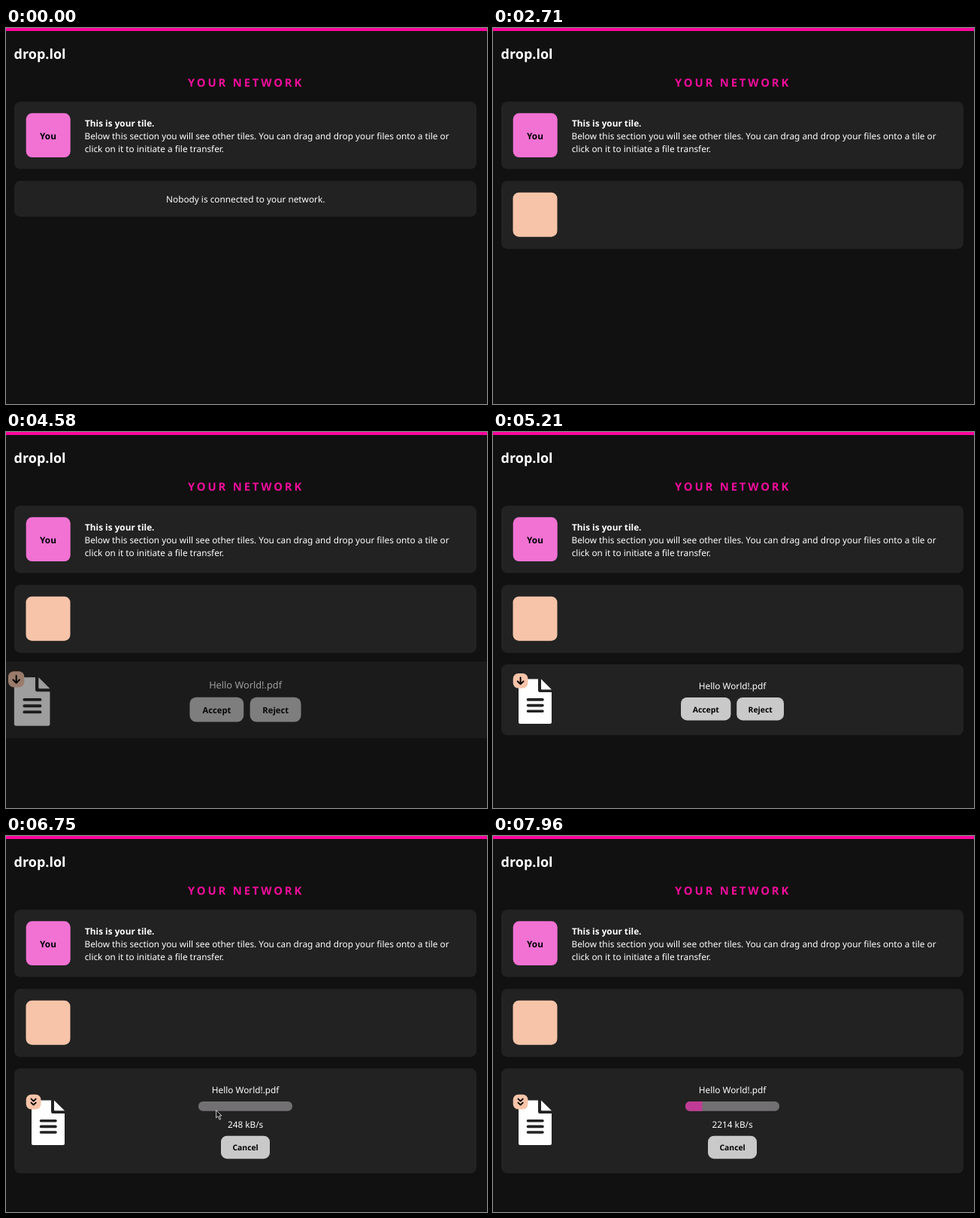
These frames come from a looping animation (640 px wide and 500 px high, 8000 ms). An HTML page:

```html
<!DOCTYPE html>
<html lang="en">
<head>
<meta charset="utf-8">
<title>Your network</title>
<style>
  html, body { margin: 0; width: 100%; height: 100%; overflow: hidden; background: #111; }
  svg { display: block; width: 640px; height: 500px; }
  text { font: 11.8px "Noto Sans", "Open Sans", sans-serif; fill: #fff; text-rendering: geometricPrecision; white-space: pre; }
  .bold { font-weight: 700; }
  .logo { font-size: 18px; font-weight: 700; }
  .title { font-size: 14.8px; font-weight: 700; letter-spacing: 2.85px; fill: #f20d9b; }
  .mid { text-anchor: middle; }
  .label { font-size: 10.4px; font-weight: 700; fill: #000; text-anchor: middle; }
  .panel { fill: #222; }
  .peach { fill: #f7c4a9; }
  .button { fill: #c9c9c9; }
  .mark { fill: none; stroke: #000; stroke-width: 1.9; stroke-linecap: round; stroke-linejoin: round; }
</style>
</head>
<body>
<svg viewBox="0 0 640 500">
  <defs>
    <g id="file">
      <path fill="#fff" d="M36 0H60V15Q60 17.5 62.5 17.5H78V57.5Q78 59.5 76 59.5H36Q34 59.5 34 57.5V2Q34 0 36 0Z M64 0L78 13.8H65.2Q64 13.8 64 12.6Z"/>
      <path stroke="#222" stroke-width="3.6" stroke-linecap="round" d="M46.5 27.3H66 M46.5 35H66 M46.5 42.6H66"/>
      <rect class="peach" x="26.7" y="-7.6" width="19.8" height="19.8" rx="7"/>
    </g>
  </defs>
  <rect width="640" height="500" fill="#111"/>
  <rect width="640" height="4" fill="#ff069e"/>
  <text class="logo" x="10.6" y="40.7">drop.lol</text>
  <text class="title" x="242" y="78">YOUR NETWORK</text>

  <rect class="panel" x="11" y="98" width="615" height="89.5" rx="8"/>
  <rect x="26.7" y="113.3" width="59" height="58.7" rx="8" fill="#f272d4"/>
  <text class="bold mid" x="56" y="148" style="fill:#000">You</text>
  <text class="bold" x="105" y="131">This is your tile.</text>
  <text x="104.5" y="148">Below this section you will see other tiles. You can drag and drop your files onto a tile or</text>
  <text x="104.7" y="164.6">click on it to initiate a file transfer.</text>

  <rect id="peers" class="panel" x="11" y="203.3" width="615" height="47.7" rx="8"/>
  <text id="nobody" class="mid" x="318.7" y="232.4">Nobody is connected to your network.</text>
  <rect id="tile" class="peach" x="-29.5" y="-29.5" width="59" height="59" rx="8"/>

  <g id="transfer">
    <rect id="card" class="panel" x="11" y="309" width="615" height="94.3" rx="8"/>
    <text class="mid" x="318.6" y="342.2">Hello World!.pdf</text>
    <g id="offer">
      <g transform="translate(0 328.6)">
        <use href="#file"/>
        <path class="mark" d="M36.6 -2.2V6.6 M32.7 2.9L36.6 6.8L40.5 2.9"/>
      </g>
      <rect class="button" x="250" y="353" width="66.4" height="30.4" rx="8"/>
      <text class="label" x="283.3" y="373">Accept</text>
      <rect class="button" x="324.2" y="353" width="62.8" height="30.4" rx="8"/>
      <text class="label" x="355.7" y="373">Reject</text>
    </g>
    <g id="loading">
      <g transform="translate(0 351.4)">
        <use href="#file"/>
        <path class="mark" d="M33.5 -1.8L36.6 1.2L39.7 -1.8 M33.5 3.2L36.6 6.2L39.7 3.2"/>
      </g>
      <clipPath id="track"><rect x="256" y="353" width="125" height="12.8" rx="6"/></clipPath>
      <g clip-path="url(#track)">
        <rect x="256" y="353" width="125" height="13" fill="#727072"/>
        <rect id="fill" x="256" y="353" width="0" height="13" fill="#c03b95"/>
      </g>
      <text id="speed" class="mid" x="318.6" y="387.6"></text>
      <rect class="button" x="286" y="398.7" width="65" height="30.5" rx="8"/>
      <text class="label" x="318.6" y="418">Cancel</text>
    </g>
  </g>

  <path id="cursor" d="M0 0V10.2L2.4 8L4.4 12.5L6.1 11.7L4.2 7.4H7.4Z" fill="#161616" stroke="#dcdcdc" stroke-width=".9"/>
</svg>
<script>
const LOOP = 8000, JOIN = 1000, OFFER = 4560, ACCEPT = 6540;
const el = Object.fromEntries([...document.querySelectorAll('svg [id]')].map(n => [n.id, n]));
const clamp = x => Math.min(1, Math.max(0, x));
const show = (node, on) => node.setAttribute('display', on ? 'inline' : 'none');
const attr = (node, name, value) => node.setAttribute(name, value);

// Damped spring from 0 to 1: stiffness 260, damping 20, mass 1
function spring(ms) {
  const s = Math.max(0, ms) / 1000, w = Math.sqrt(160);
  return 1 - Math.exp(-10 * s) * (Math.cos(w * s) + 10 / w * Math.sin(w * s));
}

// Time, x, y
const path = [[5540, 303, 501], [5670, 300, 449], [5840, 291, 396], [6100, 279.6, 364.6],
  [6840, 279.6, 364.6], [7020, 288, 410], [7220, 300, 501]];

function cursorAt(t) {
  const i = path.findIndex(p => p[0] > t);
  if (i < 1) return null;
  const [t0, x0, y0] = path[i - 1], [t1, x1, y1] = path[i];
  const k = (t - t0) / (t1 - t0);
  return [x0 + (x1 - x0) * k, y0 + (y1 - y0) * k];
}

function render(t) {
  const joined = t >= JOIN;
  attr(el.peers, 'height', joined ? 90.4 : 47.7);
  show(el.nobody, !joined);
  show(el.tile, joined);
  const p = spring(t - JOIN);
  attr(el.tile, 'transform', `translate(56 248.2) rotate(${180 * (p - 1)}) scale(${p})`);

  const accepted = t >= ACCEPT;
  show(el.transfer, t >= OFFER);
  show(el.offer, !accepted);
  show(el.loading, accepted);
  attr(el.card, 'height', accepted ? 139.6 : 94.3);
  const q = 1 - Math.exp(-Math.max(0, t - OFFER + 42) / 70);
  attr(el.transfer, 'opacity', q);
  attr(el.transfer, 'transform', `translate(318.5 356.2) scale(${1.2 - 0.2 * q}) translate(-318.5 -356.2)`);

  // Transfer progress is reported in steps
  const k = clamp(Math.floor((t - 6750) / 200) / 6);
  attr(el.fill, 'width', 22.4 * k);
  el.speed.textContent = Math.round(248 + 1966 * k) + ' kB/s';

  const at = cursorAt(t);
  show(el.cursor, at);
  if (at) attr(el.cursor, 'transform', `translate(${at})`);
}

const start = performance.now();
function frame() {
  render((performance.now() - start) % LOOP);
  requestAnimationFrame(frame);
}
frame();
</script>
</body>
</html>
```
